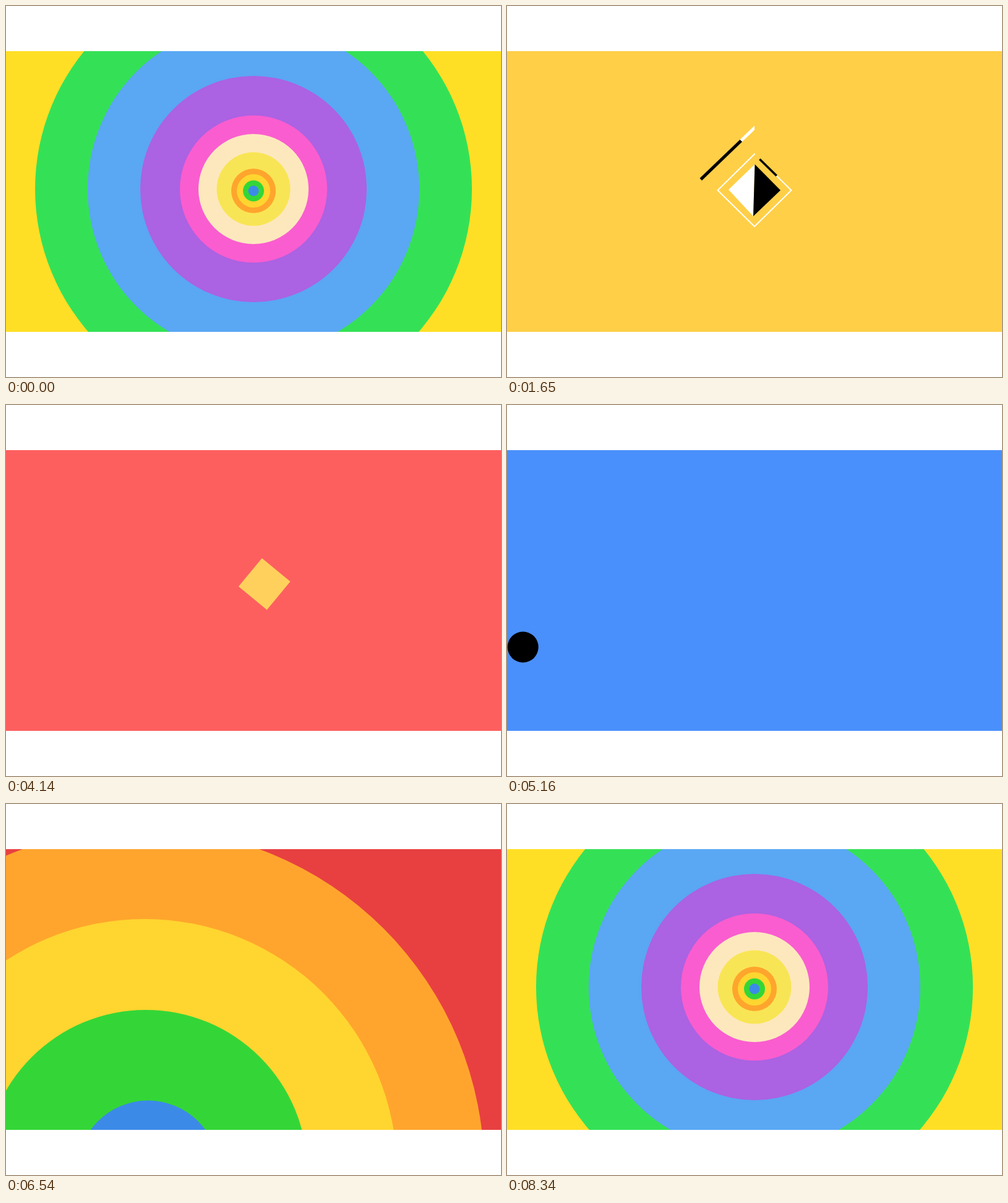
Animation of 800 by 600 pixels, one loop 8370 ms. Source, as an HTML page with a canvas:

```html
<!DOCTYPE html>
<html>
<head>
<meta charset="utf-8">
<style>
html, body { margin: 0; width: 100%; height: 100%; overflow: hidden; background: #fff; }
canvas { display: block; }
</style>
</head>
<body>
<canvas id="stage" width="800" height="600"></canvas>
<script>
const LOOP = 8370;
const c = document.getElementById('stage').getContext('2d');

const prog = (t, a, b) => Math.min(1, Math.max(0, (t - a) / (b - a)));
const mix = (a, b, k) => a + (b - a) * k;
const easeOut = k => 1 - (1 - k) ** 3;
const easeInOut = k => k * k * (3 - 2 * k);
// Unbounded growth that passes radius r at time b.
const grow = (t, a, b, r, power) => t > a ? r * ((t - a) / (b - a)) ** power : 0;

function fill(color) {
  c.fillStyle = color;
  c.fillRect(0, 0, 800, 600);
}

function disc(x, y, r, color) {
  if (r <= 0) return;
  c.beginPath();
  c.arc(x, y, r, 0, 7);
  c.fillStyle = color;
  c.fill();
}

function poly(points, color) {
  c.beginPath();
  points.forEach(([x, y]) => c.lineTo(x, y));
  c.fillStyle = color;
  c.fill();
}

function diamond(x, y, r, color, angle = 0) {
  poly([0, 1, 2, 3].map(i => {
    const a = angle + i * Math.PI / 2;
    return [x + r * Math.sin(a), y - r * Math.cos(a)];
  }), color);
}

// Strokes part of a diamond outline; s counts edges clockwise from the top.
function trace(w, h, from, to, color, width) {
  if (to <= from) return;
  const corners = [[0, -h], [w, 0], [0, h], [-w, 0]];
  const at = s => {
    const i = Math.floor(s), a = corners[i % 4], b = corners[(i + 1) % 4];
    return [400 + mix(a[0], b[0], s - i), 298 + mix(a[1], b[1], s - i)];
  };
  c.beginPath();
  c.moveTo(...at(from));
  for (let i = Math.floor(from) + 1; i < to; i++) c.lineTo(...at(i));
  c.lineTo(...at(to));
  c.strokeStyle = color;
  c.lineWidth = width;
  c.stroke();
}

const layers = [
  [480, '#ffdf25'], [353, '#34e156'], [268, '#5aa7f4'], [183, '#ab62e3'],
  [119, '#fa5dcf'], [89, '#fde8be'], [59.5, '#f8e555']
];

// Large radius, small radius, large centre x, colour.
const rainbow = [
  [555, 36, 218, '#ffa52d'], [408, 27, 224, '#ffd530'],
  [261, 17, 226, '#34d637'], [114.5, 8.5, 229.5, '#3c8ae8']
];

function drawRainbow(open, shrink) {
  rainbow.forEach(([big, small, x, color], i) => {
    const k = easeOut(prog(open, i * .1, .7 + i * .1));
    disc(mix(x, 400, shrink), mix(594, 299, shrink), mix(big, small, shrink) * k, color);
  });
}

function stripedDisc(r) {
  if (r <= 0) return;
  disc(400, 298, r, '#ffc857');
  c.save();
  c.beginPath();
  c.arc(400, 298, r, 0, 7);
  c.clip();
  for (let y = -371; y < 1000; y += 105.5) {
    poly([[0, y + 99], [800, y - 99], [800, y - 58.5], [0, y + 139.5]], '#ff65a0');
  }
  c.restore();
}

function circles(t) {
  fill('#ffdf25');
  const swell = 1 + .113 * (t / 630) ** 2;
  layers.slice(1).forEach(([r, color]) => disc(400, 296, r * swell, color));
  drawRainbow(1, 1);
  disc(402, 296, grow(t, 150, 630, 383, 1.3), '#91eed8');
  disc(401.5, 295.5, grow(t, 250, 630, 288.5, 1.3), '#ffc857');
  stripedDisc(grow(t, 450, 630, 82, 1.5));
  disc(400, 300, grow(t, 560, 630, 12, 2), '#ff65a0');
  disc(400.5, 300, grow(t, 600, 630, 2.5, 1.9), '#000');
  disc(400, 298, grow(t, 1000, 1250, 480, 1.5), '#ffcf47');
}

function frames(t) {
  fill('#ffcf47');
  const erase = easeInOut(prog(t, 1650, 2000));
  const head = 4.01 - 4 * (1 - easeOut(prog(t, 1350, 1620)));
  const start = mix(.14, 4, erase);
  trace(59.5, 58.5, Math.max(start, .6), head, '#fff', 2);
  trace(59.5, 58.5, start, Math.min(head, mix(.6, 4, erase)), '#000', 3.5);

  c.save();
  c.beginPath();
  c.rect(0, 0, 400, 298);
  c.clip();
  const shift = (t - 1650) / 250;
  const tail = 3.17 + shift, joint = 3.79 + shift;
  if (tail > 2) {
    trace(105, 101, tail, Math.min(joint, 4.02), '#000', 5);
    trace(105, 101, joint, 4.02, '#fff', 5);
  }
  c.restore();

  const k = easeOut(prog(t, 1300, 1500));
  const turn = 2 * (1 - k);
  c.save();
  c.translate(400, 298);
  c.rotate(turn);
  c.scale(k, k);
  poly([[-42, -1], [.5, -42], [-2, 42]], '#fff');
  poly([[.5, -42], [42, 0], [-2, 42]], '#000');
  c.restore();
}

function redScene(t) {
  const k = easeInOut(prog(t, 2300, 2800));
  diamond(400, 298, 760 * k, '#fd5f5f');
  const slide = easeInOut(prog(t, 2500, 2860));
  let x = mix(400, 424, slide), y = mix(298, 300, slide), spin = 0;
  if (t > 3390) {
    const q = easeInOut(prog(t, 3390, 4200));
    const a = q * Math.PI * 2;
    x = 424 - 146 * (1 - Math.cos(a)) + 60 * Math.sin(a);
    y = 300 + 110 * Math.sin(a);
    spin = a;
  }
  if (k > 0) diamond(x, y, 42, '#ffd15c', spin);
  disc(424, 300, 620 * easeInOut(prog(t, 4400, 4900)), '#4a90fc');
}

function ball(t) {
  fill('#4a90fc');
  const x = 25.5 + (t - 5160) * .3;
  let y = 391.5 + 110 * (prog(t, 5160, 5400) ** 2);
  if (t > 5400) {
    const d = (t - 5400) / 200;
    y = 501.5 - 150 * d * (2 - d);
  }
  disc(x, y, 25, '#000');
}

function rings(t) {
  ball(t);
  disc(229, 594, 800 * easeOut(prog(t, 5840, 6240)), '#e84040');
  layers.forEach(([r, color], i) => {
    const start = 7590 + i * 60;
    disc(400, 296, r * easeOut(prog(t, start, start + 390)), color);
  });
  drawRainbow(prog(t, 5900, 6500), easeInOut(prog(t, 6560, 7560)));
}

function draw(t) {
  c.clearRect(0, 0, 800, 600);
  c.save();
  c.beginPath();
  c.rect(0, 73, 800, 454);
  c.clip();
  if (t < 1300) circles(t);
  else if (t < 4920) {
    frames(t);
    if (t > 2300) redScene(t);
  } else if (t < 5840) ball(t);
  else rings(t);
  c.restore();
}

const begin = performance.now();
function tick() {
  draw((performance.now() - begin) % LOOP);
  requestAnimationFrame(tick);
}
tick();
</script>
</body>
</html>
```
